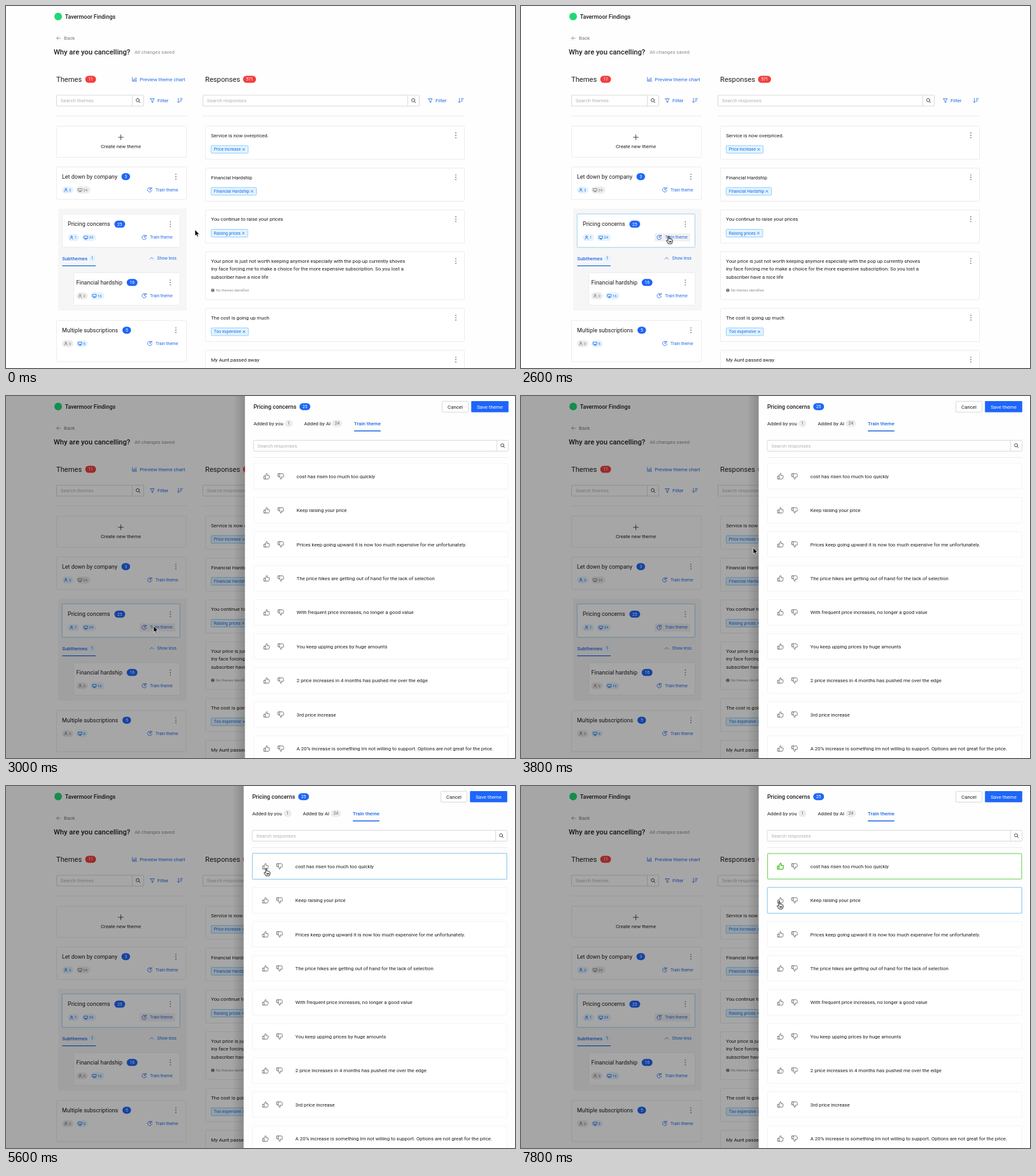
Animation, 800 px wide and 568 px high, one loop 8000 ms. Source, as an HTML page:

```html
<!DOCTYPE html>
<html lang="en">
<head>
<meta charset="utf-8">
<title>Theme training</title>
<style>
html, body { margin: 0; width: 100%; height: 100%; overflow: hidden; background: #fefefe; }
svg { display: block; width: 100vw; height: 100vh; font-family: Roboto, Arial, sans-serif; }
text { fill: #1f1f1f; white-space: pre; }
.icon { fill: none; stroke: #555; stroke-width: .8; stroke-linecap: round; stroke-linejoin: round; }
.anim { animation: 8s step-end -20ms infinite; }

#card-hover { animation-name: cardHover; }
#button-hover { animation-name: buttonHover; }
#row-one { animation-name: rowOne; }
#row-two { animation-name: rowTwo; }
#liked { animation-name: liked; }
#mask { animation-name: mask; }
#drawer { animation-name: drawer; }
#cursor { animation-name: cursor; }
#arrow { animation-name: arrow; }
#hand { animation-name: hand; }

@keyframes cardHover { 0% { visibility: hidden } 20%, 100% { visibility: visible } }
@keyframes buttonHover { 0% { visibility: hidden } 25%, 100% { visibility: visible } }
@keyframes rowOne { 0%, 75% { visibility: hidden } 55% { visibility: visible } 100% { visibility: hidden } }
@keyframes rowTwo { 0%, 55% { visibility: hidden } 52.5%, 80%, 100% { visibility: visible } }
@keyframes liked { 0% { visibility: hidden } 75%, 100% { visibility: visible } }
@keyframes mask { 0% { opacity: 0 } 35% { opacity: .15 } 37.5%, 100% { opacity: .35 } }
@keyframes drawer {
  0% { transform: translateX(840px) }
  35% { transform: translateX(600px) }
  37.5% { transform: translateX(375.6px) }
  40%, 100% { transform: translateX(373.6px) }
}
@keyframes cursor {
  0% { transform: translate(297px, 351px) }
  12.5% { transform: translate(297px, 351px); animation-timing-function: steps(3) }
  20% { transform: translate(260px, 358px); animation-timing-function: steps(2) }
  25% { transform: translate(232px, 361px) }
  40% { transform: translate(232px, 361px); animation-timing-function: steps(3) }
  47.5% { transform: translate(365px, 238px); animation-timing-function: steps(3) }
  55% { transform: translate(409px, 129px) }
  75% { transform: translate(409px, 129px); animation-timing-function: steps(3) }
  82.5%, 100% { transform: translate(406px, 181px) }
}
@keyframes hand {
  0%, 35%, 77.5% { visibility: hidden }
  25%, 55%, 82.5%, 100% { visibility: visible }
}
@keyframes arrow {
  0%, 35%, 77.5% { visibility: visible }
  25%, 55%, 82.5%, 100% { visibility: hidden }
}
</style>
</head>
<body>
<svg id="stage" viewBox="0 0 800 568"></svg>
<script>
const BLUE = '#1f69e8', VIVID = '#1e66fa', RED = '#f23f3f', GRAY = '#8c8c8c', LINE = '#ececee';
const SMALL = 6.72, BODY = 7.84, TITLE = 8.96, HEAD = 11.2;

// Text is placed by its left edge and the middle of its capitals.
const text = (x, y, size, str, fill = '#1f1f1f', more = '') =>
  `<text x="${x}" y="${y + size * .355}" font-size="${size}" style="fill:${fill}" ${more}>${str}</text>`;
const centered = (x, y, size, str, fill) => text(x, y, size, str, fill, 'text-anchor="middle"');
const bold = (x, y, size, str, fill) => text(x, y, size, str, fill, 'font-weight="500"');
const box = (x, y, w, h, fill = '#fff', stroke = LINE, r = 1) =>
  `<rect x="${x}" y="${y}" width="${w}" height="${h}" rx="${r}" fill="${fill}" stroke="${stroke}"/>`;
const icon = (x, y, d, color = '#555', more = '') =>
  `<path class="icon" transform="translate(${x} ${y})" d="${d}" style="stroke:${color}" ${more}/>`;
const rule = (x1, x2, y, color = LINE, w = 1) =>
  `<path d="M${x1} ${y}H${x2}" stroke="${color}" stroke-width="${w}"/>`;

const pill = (x, y, str, fill, color = '#fff', w = 10 + 3.5 * str.length) =>
  box(x, y - 5.5, w, 11, fill, 'none', 5.5) + centered(x + w / 2, y, 6.6, str, color);
const kebab = (x, y) => [-3.7, 0, 3.7].map(d => `<circle cx="${x}" cy="${y + d}" r=".85" fill="#666"/>`).join('');

const USER = 'M-2.3 2.6C-2.3 -.3 2.3 -.3 2.3 2.6M1.3 -1.3A1.3 1.3 0 1 1 -1.3 -1.3A1.3 1.3 0 1 1 1.3 -1.3';
const SCREEN = 'M-2.8 -2.2H2.8V1.3H-2.8ZM-1.4 2.6H1.4M0 1.3V2.6';
const CLOCK = 'M2.9 -2A3.5 3.5 0 1 0 3.5 .8M0 -2V.2H1.7M1.2 -2H3.2V-3.6';
const FUNNEL = 'M-3 -3H3L.9 .2V3L-.9 2.2V.2Z';
const SORT = 'M-2.4 -3.4V3.2M-4 1.6L-2.4 3.2L-.8 1.6M.5 -3H4M.5 -.8H3M.5 1.4H2';
const LENS = 'M2 -.7A2.5 2.5 0 1 1 -3 -.7A2.5 2.5 0 1 1 2 -.7M1.3 1.2L3.2 3.2';
const THUMB = 'M-4.3 -.4H-2.2V4.2H-4.3ZM-2.2 -.4L-.4 -4.4C1.2 -4.6 1.2 -3 .6 -1.2H3.4C4.5 -1.2 4.6 0 4 .8C4.1 2.5 3.6 4.2 2.5 4.2H-2.2';

function search(x, y, w, label) {
  return box(x, y, w, 17, '#fff', '#d9d9d9') +
    `<path d="M${x + w - 18} ${y}v17" stroke="#d9d9d9"/>` +
    text(x + 6.3, y + 8.5, BODY, label, '#b2b2b2') + icon(x + w - 9, y + 8.5, LENS, '#222', 'stroke-width="1"');
}

const filter = (x, sortX) => icon(x, 148.5, FUNNEL, BLUE) + text(x + 8, 148.5, BODY, 'Filter', BLUE) +
  icon(sortX, 148.2, SORT, BLUE);

function chip(x, y, shape, count, on) {
  const color = on ? BLUE : '#777';
  return box(x, y - 5.5, 14 + 4 * count.length, 11, on ? '#e3f3ff' : '#ececec', 'none', 5.5) +
    icon(x + 6, y, shape, color, 'stroke-width=".6"') + text(x + 11, y, 5.8, count, color);
}

// One theme: heading, count, two source chips and the train link.
function theme(x, y, right, title, count, badgeX, you, ai, youOn, aiOn) {
  return text(x, y, TITLE, title) + pill(badgeX, y, count, VIVID) + kebab(right, y) +
    chip(x, y + 21, USER, you, youOn) + chip(x + 22.5, y + 21, SCREEN, ai, aiOn) +
    icon(right - 41, y + 20.7, CLOCK, BLUE) + text(right - 32, y + 20.7, SMALL, 'Train theme', BLUE);
}

function tag(y, label, w) {
  return box(322.5, y - 6, w, 12, '#e3f4ff', '#91d0fb') + text(326.8, y, SMALL, label, BLUE) +
    icon(322.5 + w - 7, y, 'M-1.7 -1.7L1.7 1.7M1.7 -1.7L-1.7 1.7', BLUE);
}

function response(y, lines, label, w) {
  const h = lines.length > 1 ? 75 : 52;
  return box(313.5, y - 14.7, 407, h) + kebab(707, y - .3) +
    lines.map((s, i) => text(322.2, y + i * 12.3, BODY, s)).join('') +
    (label ? tag(y + 21.8, label, w) : '');
}

const header = `<circle cx="82" cy="16.5" r="6" fill="#22d873"/>` +
  bold(92.7, 16.8, TITLE, 'Tavermoor Findings') +
  icon(82.5, 50.5, 'M3 0H-3M-.4 -2.7L-3 0L-.4 2.7', GRAY) + text(91, 50.5, BODY, 'Back', '#777') +
  bold(75, 72.3, HEAD, 'Why are you cancelling?') + text(202, 72.3, BODY, 'All changes saved', GRAY);

const themes = text(79, 115, HEAD, 'Themes') + pill(124.5, 115, '11', RED) +
  icon(202, 115, 'M-3.3 -3V3H3.5M-1.5 2V.2M.4 2V-1.2M2.4 2V-2.6', BLUE) +
  text(210.3, 115, BODY, 'Preview theme chart', BLUE) +
  search(79.5, 140, 137, 'Search themes') + filter(230, 273.5) + rule(79, 284, 172.5) +
  box(79.5, 188.5, 204, 49) + icon(180.5, 206, 'M-4 0H4M0 -4V4', '#222') +
  centered(180.5, 220.3, BODY, 'Create new theme') +
  box(79.5, 252.5, 204, 51) + theme(88, 267.7, 267, 'Let down by company', '3', 181.5, '3', '24', true, false) +
  box(82, 318, 202, 160, '#f6f6f7', 'none') + box(88.5, 326.5, 185, 52) +
  `<g id="card-hover" class="anim">${box(88.2, 326.2, 185.2, 52.6, '#fff', '#a0d3ee')}</g>` +
  `<g id="button-hover" class="anim">${box(210, 356.5, 56, 13, '#f1f1f2', 'none')}</g>` +
  theme(97, 342.3, 258.3, 'Pricing concerns', '25', 170.3, '1', '24', true, true) +
  bold(88.3, 395.8, BODY, 'Subthemes', BLUE) + pill(130, 395.8, '1', '#e3f3ff', BLUE, 11) +
  rule(88.3, 141, 407.7, BLUE, 1.3) +
  icon(229, 395.8, 'M-2.8 1.4L0 -1.4L2.8 1.4', BLUE, 'stroke-width="1"') + text(237.5, 395.8, SMALL, 'Show less', BLUE) +
  box(106.5, 418.5, 167, 51) +
  theme(110.5, 433.8, 258.3, 'Financial hardship', '16', 189.7, '0', '16', false, true) +
  box(79.5, 493.5, 204, 64.5) +
  theme(88, 508.7, 267, 'Multiple subscriptions', '5', 183, '0', '5', false, true);

const responses = text(313, 115, HEAD, 'Responses') + pill(372.5, 115, '571', RED, '#fff', 20.5) +
  search(309.5, 140, 340, 'Search responses') + filter(667, 715) + rule(309, 721, 172.5) +
  response(203.2, ['Service is now overpriced.'], 'Price increase', 58) +
  response(269, ['Financial Hardship'], 'Financial Hardship', 71) +
  response(334.7, ['You continue to raise your prices'], 'Raising prices', 57.5) +
  response(400.3, [
    'Your price is just not worth keeping anymore especially with the pop up currently shoves',
    'iny face forcing me to make a choice for the more expensive subscription. So you lost a',
    'subscriber have a nice life']) +
  `<circle cx="325" cy="446" r="2.6" fill="#666"/>` + icon(325, 446, 'M0 -1.2V.2M0 1.2V1.3', '#fff') +
  text(330, 446, 5.6, 'No themes identified', GRAY) +
  response(489.3, ['The cost is going up much'], 'Too expensive', 58.5) +
  response(555, ['My Aunt passed away']);

const comments = [
  'cost has risen too much too quickly',
  'Keep raising your price',
  'Prices keep going upward it is now too much expensive for me unfortunately.',
  'The price hikes are getting out of hand for the lack of selection',
  'With frequent price increases, no longer a good value',
  'You keep upping prices by huge amounts',
  '2 price increases in 4 months has pushed me over the edge',
  '3rd price increase',
  'A 20% increase is something Im not willing to support. Options are not great for the price.'
];
const rowY = i => 126 + 53.4 * i;
const rowBox = (i, stroke) => box(14, rowY(i) - 20, 399.3, 40, '#fff', stroke);
const hoverRow = (id, i) => `<g id="${id}" class="anim">` +
  `<rect x="13.7" y="${rowY(i) - 20.3}" width="399.9" height="40.6" rx="1" fill="none" stroke="#9fd2f0" stroke-width="1.3"/></g>`;
const comment = (str, i) => rowBox(i, '#f3f3f4') + icon(34.3, rowY(i), THUMB) +
  `<g transform="translate(56.6 ${rowY(i)}) scale(1 -1)">${icon(0, 0, THUMB)}</g>` +
  text(81.2, rowY(i), BODY, str);

const drawer = `<rect x="-18" width="18" height="568" fill="url(#shade)"/><rect width="460" height="568" fill="#fefefe"/>` +
  bold(13.3, 16.7, TITLE, 'Pricing concerns') + pill(85.7, 16.7, '25', VIVID) +
  box(309.9, 8.3, 41, 17, '#fff', '#d9d9d9') + centered(330.4, 16.8, BODY, 'Cancel') +
  box(355.6, 8, 58.6, 17.5, VIVID, 'none') + centered(384.9, 16.8, BODY, 'Save theme', '#fff') +
  text(13.3, 43, BODY, 'Added by you') + pill(62.6, 43, '1', '#ececec', '#666', 12.5) +
  text(92.9, 43, BODY, 'Added by AI') + pill(136.8, 43, '24', '#ececec', '#666', 16) +
  bold(171.5, 43, BODY, 'Train theme', BLUE) + rule(171.5, 213.3, 54.8, BLUE, 1.4) +
  search(13.4, 69.5, 400.6, 'Search responses') + rule(13.4, 414, 96.5) +
  comments.map(comment).join('') +
  hoverRow('row-one', 0) + hoverRow('row-two', 1) +
  `<g id="liked" class="anim"><rect x="14" y="106" width="399.3" height="40" rx="1" fill="none" stroke="#68cf4d"/>` +
  `<g transform="translate(34.3 126) scale(1.1)"><path class="icon" d="${THUMB}" style="stroke:#4cc22d;stroke-width:1.1;fill:#effbe9"/></g></g>`;

const cursor = `<path id="arrow" class="anim" d="M0 0V9.8L2.2 7.8L3.7 11.2L5.4 10.5L3.9 7.2H7Z" fill="#000" stroke="#fff" stroke-width=".7"/>` +
  `<path id="hand" class="anim" d="M-1 .8C-1 -.4 .8 -.4 .8 .8V4.5C1.2 3.9 2.3 4 2.5 4.8C3 4.3 4.2 4.5 4.3 5.3C5 5 6 5.4 6 6.3V8.5C6 10.3 5 11 4.8 12H-.5C-1 10.5 -2.8 8.8 -3.3 7.6C-3.6 6.3 -2.2 6.2 -1 7.5ZM.9 7.5V10M2.4 7.5V10M3.9 7.5V10" fill="#fff" stroke="#000" stroke-width=".9" stroke-linejoin="round"/>`;

document.getElementById('stage').innerHTML =
  `<defs><linearGradient id="shade"><stop offset="0" stop-opacity="0"/><stop offset="1" stop-opacity=".16"/></linearGradient></defs>` +
  `<rect width="800" height="568" fill="#fefefe"/>` + header + themes + responses +
  `<rect id="mask" class="anim" width="800" height="568"/>` +
  `<g id="drawer" class="anim">${drawer}</g><g id="cursor" class="anim">${cursor}</g>`;
</script>
</body>
</html>
```
